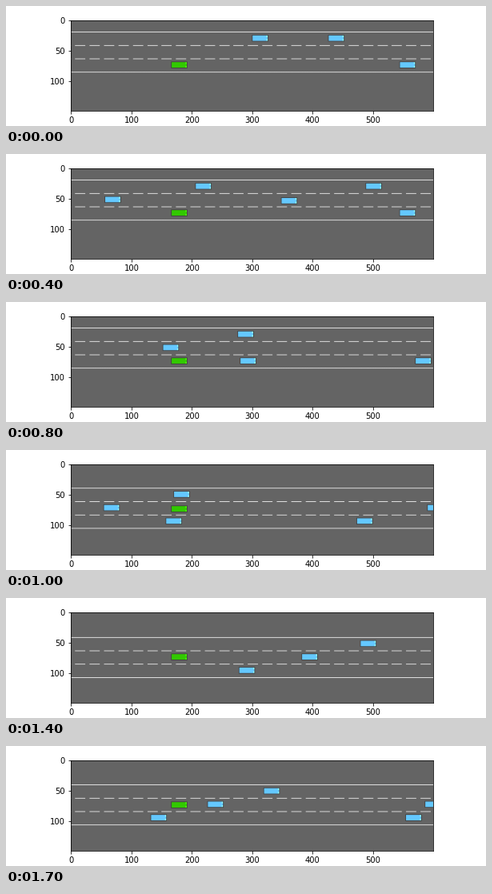
A matplotlib script that plays this animation: 600x150 px, repeating every 1800 ms.

```python
import numpy as np
import matplotlib.pyplot as plt
from matplotlib.animation import FuncAnimation

DPI = 72
W, H = 600, 150
FRAMES, INTERVAL = 18, 100

SCALE = 5.5                      # scene pixels per metre
LANE = 22
STRIPE, DASH = 4.33 * SCALE, 17
CAR_L, CAR_W = 27, 11
EGO_SPEED, CAR_SPEED = 30, 21
EGO_X, EGO_Y, EGO_TURN = 166, 69, 8

GREY, WHITE, EDGE = (100, 100, 100), (255, 255, 255), (60, 60, 60)
GREEN, BLUE = (50, 200, 0), (100, 200, 255)

# lane, lanes to move, step of the move, polynomial for x over the steps
TRAFFIC = [
    (0, 1, 1, (-61, 313)),
    (0, 0, 0, (-1, -50.9, 439.5)),
    (2, -1, 2, (-49.1, 558)),
    (0, 0, 0, (-52.9, 713)),
    (2, 0, 0, (0.7, -74.3, 843.6)),
    (2, 0, 0, (-48.65, 973)),
    (1, 0, 0, (-51.9, 1122)),
    (0, 0, 0, (-53.4, 1240.5)),
    (1, 0, 0, (-52, 1483)),
    (2, 0, 0, (-50, 1418)),
]

YY, XX = np.mgrid[0:H, 0:W]


def glide(steps):
    """Progress of a lane change, 0 to 1."""
    return 1 - np.exp(-0.92 * max(steps, 0) ** 1.4)


def heading(steps, direction, speed):
    """Yaw while changing lane; small angles are drawn straight."""
    if steps <= 0:
        return 0
    angle = np.arcsin((1 - glide(steps)) * 4 / 0.6 / speed)
    return direction * angle if angle > np.radians(2) else 0


def car_sprite(color):
    """Body with two headlights inside a thin outline."""
    sprite = np.full((CAR_W, CAR_L, 3), EDGE, np.uint8)
    sprite[1:-1, 1:-1] = color
    light = np.minimum(np.array(color) / 0.68, 255)
    sprite[1:4, -3:-1] = light
    sprite[7:10, -3:-1] = light
    return sprite


def draw_car(img, sprite, left, top, angle=0):
    dx = XX + 0.5 - left - CAR_L / 2
    dy = YY + 0.5 - top - CAR_W / 2
    c, s = np.cos(angle), np.sin(angle)
    u = np.floor(c * dx + s * dy + CAR_L / 2).astype(int)
    v = np.floor(c * dy - s * dx + CAR_W / 2).astype(int)
    inside = (u >= 0) & (u < CAR_L) & (v >= 0) & (v < CAR_W)
    img[inside] = sprite[v[inside], u[inside]]


BLUE_CAR, GREEN_CAR = car_sprite(BLUE), car_sprite(GREEN)
DASHES = (np.arange(W) - 7) % STRIPE < DASH


def scene(n):
    img = np.full((H, W, 3), GREY, np.uint8)

    # The view follows the green car, so its lane change moves the road.
    turn = n - EGO_TURN
    road = round(20 + LANE * glide(turn) - 0.06 * max(turn, 0))
    img[[road, road + 3 * LANE]] = WHITE
    for k in (1, 2):
        img[road + k * LANE, DASHES] = WHITE

    for lane, move, begin, path in TRAFFIC:
        x = np.polyval(path, n)
        y = road + 5 + LANE * (lane + move * glide(n - begin))
        draw_car(img, BLUE_CAR, round(x - CAR_L / 2), round(y),
                 heading(n - begin, move, CAR_SPEED))

    draw_car(img, GREEN_CAR, EGO_X, EGO_Y, heading(turn, -1, EGO_SPEED))
    return img


plt.rcParams["font.family"] = "DejaVu Sans"
fig, ax = plt.subplots(figsize=(W / DPI, H / DPI), dpi=DPI, facecolor="white")
fig.subplots_adjust(left=0.125, right=0.9, bottom=0.125, top=0.88)
view = ax.imshow(scene(0))


def update(n):
    view.set_data(scene(n))
    return [view]


anim = FuncAnimation(fig, update, frames=FRAMES, interval=INTERVAL,
                     repeat=True, repeat_delay=0)
plt.show()
```
